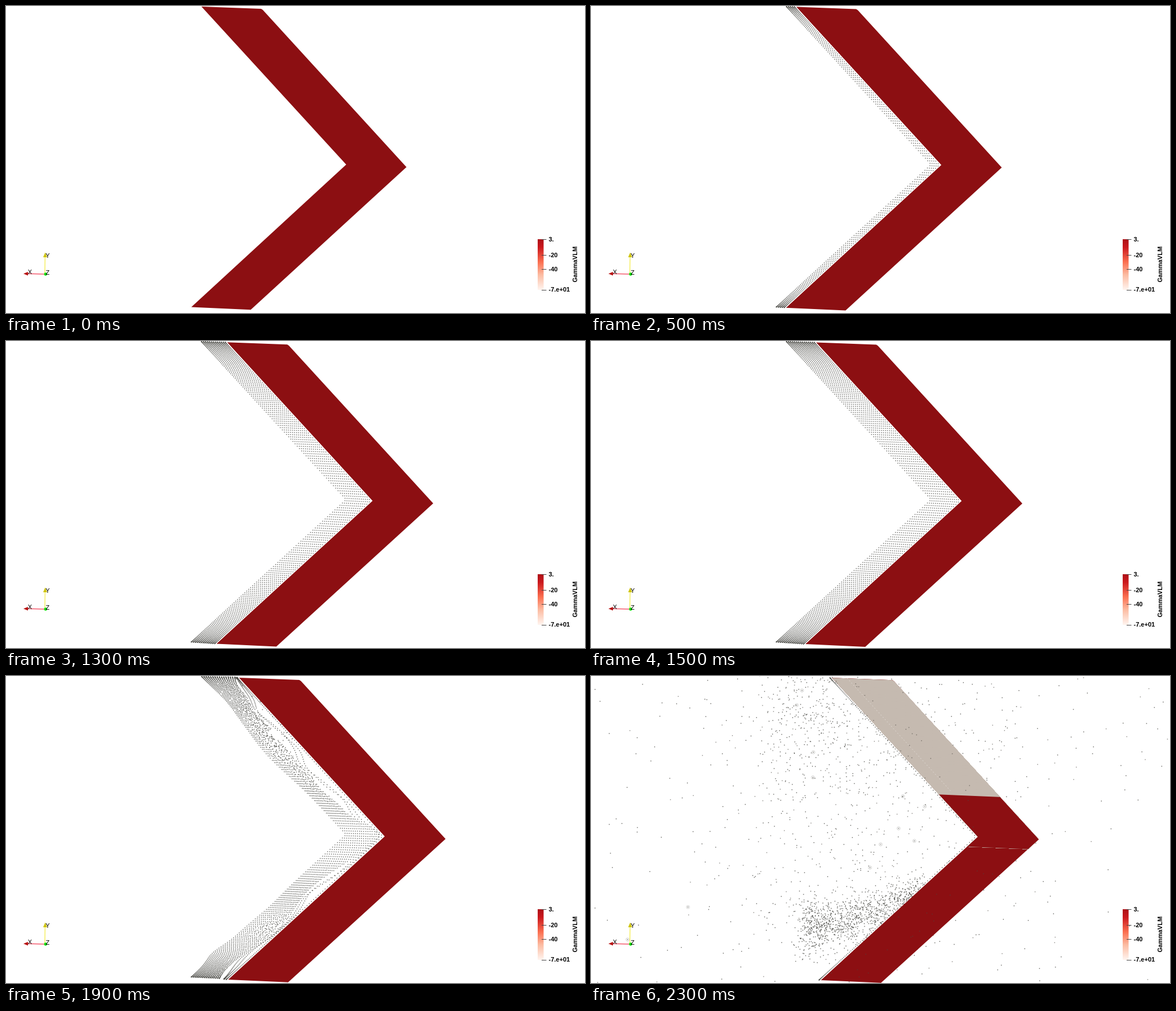
Write an HTML page with a canvas that moves like this. It is 1028x545 px and loops after 2400 ms.

```html
<!DOCTYPE html>
<html lang="en">
<head>
<meta charset="utf-8">
<title>Wing wake</title>
<style>
  html, body { margin: 0; width: 1028px; height: 545px; overflow: hidden; background: #fff; }
  canvas, svg { position: absolute; left: 0; top: 0; display: block; }
  text { font-family: "Liberation Sans", Arial, sans-serif; font-size: 11px; }
  .legend { font-weight: bold; }
  .axis { font-size: 12.5px; }
</style>
</head>
<body>
<canvas id="stage" width="1028" height="545"></canvas>
<svg width="1028" height="545" viewBox="0 0 1028 545">
  <defs>
    <linearGradient id="reds" x1="0" y1="0" x2="0" y2="1">
      <stop offset="0" stop-color="#ad1117"/>
      <stop offset=".16" stop-color="#cb181d"/>
      <stop offset=".45" stop-color="#fb6f50"/>
      <stop offset=".7" stop-color="#fcbba1"/>
      <stop offset="1" stop-color="#fff5f0"/>
    </linearGradient>
  </defs>
  <rect x="944" y="414" width="10.5" height="90" fill="url(#reds)"/>
  <path d="M951 414.5h8.5M951 442.5h8.5M951 467.5h8.5M951 504.5h8.5" stroke="#444"/>
  <g class="legend">
    <text x="963.5" y="418">3.</text>
    <text x="963.5" y="446">-20</text>
    <text x="963.5" y="471">-40</text>
    <text x="963.5" y="507">-7.e+01</text>
    <text transform="translate(1014 490.5) rotate(-90)">GammaVLM</text>
  </g>
  <path d="M70 476L39 475.2" stroke="#f4566a" stroke-width="1.4"/>
  <path d="M69 474L69.4 446" stroke="#f6f06a" stroke-width="1.6"/>
  <path d="M31 475.2L39 472v6.5z" fill="#b80f0f"/>
  <path d="M69.6 437.5L73 446h-7z" fill="#cfc410"/>
  <circle cx="70.3" cy="476" r="2.7" fill="#12e312"/>
  <g class="axis">
    <text x="38.8" y="476">X</text>
    <text x="70.3" y="447">Y</text>
    <text x="70.5" y="477">Z</text>
  </g>
</svg>
<script>
const ctx = document.getElementById('stage').getContext('2d');
const STEP = 100, STEPS = 24, SPAN = 98, ROLL_STEP = 21;
const INNER = [604, 281.5], NOSE = [711, 286], TIPS = [[347, 1], [329, 534.5]];
const CHORD = 0.042, HALF = 209.5;

const clamp = v => Math.max(0, Math.min(1, v));
const mix = (a, b, t) => a.map((v, i) => v + (b[i] - v) * t);
const bump = (s, at, width) => Math.exp(-(((s - at) / width) ** 2));

let seed = 7;
function rnd() {
  seed = (seed + 0x6D2B79F5) | 0;
  let t = Math.imul(seed ^ (seed >>> 15), 1 | seed);
  t = (t + Math.imul(t ^ (t >>> 7), 61 | t)) ^ t;
  return ((t ^ (t >>> 14)) >>> 0) / 4294967296;
}
const gauss = () => Math.sqrt(-2 * Math.log(1 - rnd())) * Math.cos(2 * Math.PI * rnd());

// Wing motion, slightly enlarged by the perspective.
const fly = ([x, y], k) => [
  x + k * (3.35 + 0.00047 * x - 0.00011 * y),
  y + k * (0.1 + 0.00026 * y)
];
const shed = (side, s, row) => fly(mix(INNER, TIPS[side], s), row);

const rolled = k => clamp((k - 17) / 4) ** 1.5;
const burst = k => clamp((k - ROLL_STEP) / 2) ** 1.7;

// Rolled-up sheet: distance of its rear and front edge from the first row.
const rear = (side, s) => side
  ? 9 * bump(s, 0.5, 0.1) - 24 * bump(s, 0.83, 0.07)
  : -30 * bump(s, 0.5, 0.18) + 13 * bump(s, 0.85, 0.1);
const front = (side, s) => side
  ? 38 + 28 * Math.cos(11 * (s - 0.08)) + 30 * s ** 8
  : 66 * bump(s, 0, 0.13) + 78 * s ** 5 - 9 + 6 * Math.sin(38 * s);

function rollPose(p) {
  const { side, s, row } = p;
  const [x, y] = mix(INNER, TIPS[side], s);
  const a = rear(side, s), b = front(side, s), edge = shed(side, s, ROLL_STEP - 1);
  const rough = 0.5 + (side ? 3 * bump(s, 0.64, 0.08) : 7 * bump(s, 0.57, 0.22));
  const jitter = (px, py, n) => [px + gauss() * n, py + gauss() * n];
  if (!side && rnd() < 0.05 * bump(s, 0.7, 0.2)) {
    p.top = true;
    return [500 + 145 * rnd() ** 2, 20 + 110 * rnd()];
  }
  if (row < 16) {
    const t = row / 15;
    return jitter(x + a + (b - a) * t, y, rough * t);
  }
  const lip = [x + b, y];
  if (row < 18) return mix(lip, edge, 0.4 + 0.3 * Math.sin(s * 17 + row));
  return jitter(...mix(lip, edge, rnd()), rough);
}

const cloud = (x, y, w, h) => [x + gauss() * w, y + gauss() * h];

function burstPose(p) {
  const q = rnd();
  if (p.side && q < 0.48) {
    const t = rnd() ** 1.4;
    return cloud(380 + 205 * t, 445 - 70 * t * t, 11, 26 - 14 * t);
  }
  p.top = rnd() < 0.3;
  p.ring = rnd() < 0.012;
  if (q > 0.96) return [1028 * rnd(), 545 * rnd()];
  if (p.side && q < 0.62) return cloud(460, 395, 130, 85);
  if (!p.side && q < 0.18) return cloud(385, 50, 52, 85);
  if (!p.side && q < 0.45) return cloud(520, 130, 160, 110);
  const ang = rnd() * 2 * Math.PI;
  return [514 + 1500 * Math.cos(ang), 272 + 1500 * Math.sin(ang)];
}

const dots = [];
for (let side = 0; side < 2; side++)
  for (let row = 0; row < STEPS - 1; row++)
    for (let i = 0; i < SPAN; i++) {
      const p = { side, row, s: Math.sin((i + 0.5) / SPAN * Math.PI / 2) };
      p.base = shed(side, p.s, row);
      p.roll = rollPose(p);
      p.burst = burstPose(p);
      dots.push(p);
    }

function drawDots(k, top) {
  const size = 1.5, blown = burst(k);
  ctx.fillStyle = top ? 'rgba(75,72,66,.6)' : 'rgba(75,75,70,.8)';
  ctx.strokeStyle = 'rgba(75,75,70,.5)';
  ctx.lineWidth = 0.5;
  for (const p of dots) {
    const fresh = p.row === k - 1;
    if (p.row >= k || (!fresh && k > 19 && !!p.top) !== top) continue;
    const [x, y] = fresh ? p.base : mix(mix(p.base, p.roll, rolled(k)), p.burst, blown);
    ctx.fillRect(x - size / 2, y - size / 2, size, size);
    if (blown === 1 && p.ring && !fresh) {
      ctx.beginPath();
      ctx.arc(x, y, 2.8, 0, 7);
      ctx.stroke();
    }
  }
}

const DARK = [140, 15, 18], WARM = [203, 88, 64], PALE = [197, 186, 176];
const shade = v => `rgb(${(v < 0.5 ? mix(DARK, WARM, 2 * v) : mix(WARM, PALE, 2 * v - 1)).map(Math.round)})`;

// The load spreads over the upper half and its borders sharpen.
function drawLoad(k) {
  const age = k - 19, limit = HALF * (1 - 0.3 ** age), blur = 0.15 ** (age - 2);
  const band = HALF / 35;
  ctx.save();
  ctx.clip();
  ctx.transform(1, CHORD, 0, 1, 0, -600 * CHORD);
  for (let i = 0; i <= 35; i++) {
    const y = i * band, m = y + band / 2;
    const load = clamp((limit - m) / (45 * blur)) * clamp((m - 6) / (18 * blur));
    ctx.fillStyle = shade(load);
    ctx.fillRect(300, y, 500, 300 - y);
  }
  ctx.restore();
  const reach = clamp((limit - 45 * blur) / HALF);
  ctx.strokeStyle = 'rgba(255,255,255,.6)';
  ctx.lineWidth = 1;
  ctx.setLineDash([1.5, 4]);
  ctx.beginPath();
  ctx.moveTo(455, 4);
  ctx.lineTo(455 + 188 * reach, 4 + 205 * reach);
  ctx.stroke();
  ctx.setLineDash([]);
}

function drawWing(k) {
  const outline = [TIPS[0], [453, 5], [456, 7], NOSE, [434.5, 539.3], TIPS[1], INNER];
  ctx.beginPath();
  outline.forEach(p => ctx.lineTo(...fly(p, k)));
  ctx.closePath();
  ctx.fillStyle = shade(0);
  ctx.fill();
  if (k > 19) drawLoad(k);
}

function draw(k) {
  ctx.fillStyle = '#fff';
  ctx.fillRect(0, 0, 1028, 545);
  drawDots(k, false);
  drawWing(k);
  drawDots(k, true);
}

const start = performance.now();
let shown = -1;
function tick() {
  const k = Math.floor((performance.now() - start) / STEP) % STEPS;
  if (k !== shown) draw(shown = k);
  requestAnimationFrame(tick);
}
tick();
</script>
</body>
</html>
```
